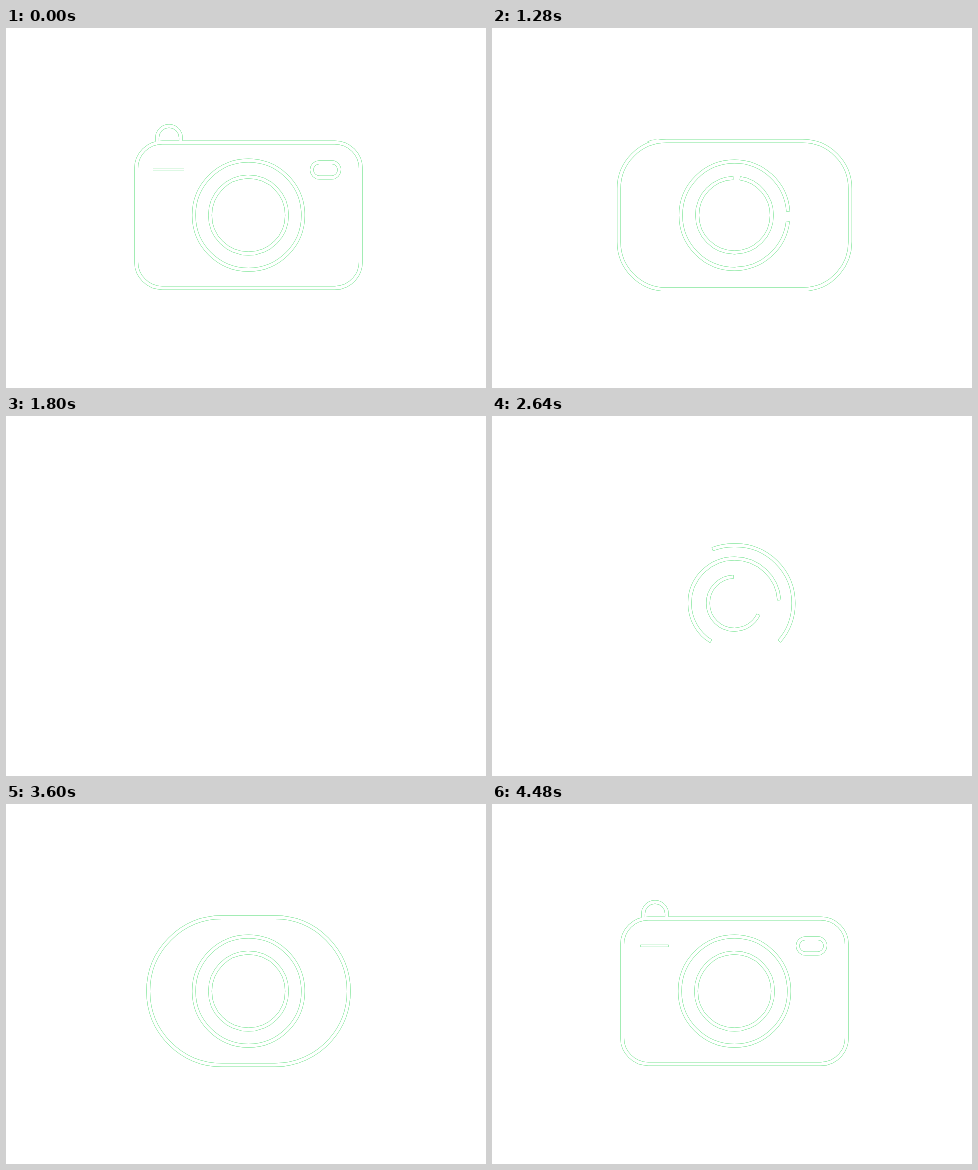
Recreate the animation shown at these times as an HTML page with a canvas. Size 480x360 px, loop 4.52 s.

```html
<!DOCTYPE html>
<html lang="en">
<head>
<meta charset="utf-8">
<title>Camera outline</title>
<style>
  html, body { margin: 0; width: 100%; height: 100%; overflow: hidden; background: #fff; }
  canvas { display: block; }
</style>
</head>
<body>
<canvas id="stage" width="480" height="360"></canvas>
<script>
const W = 480, H = 360, LOOP = 4520, STEP = 40;
const CX = 242.5, CY = 187.2;
const TINT = [162, 236, 180];

const view = document.getElementById('stage').getContext('2d');
const layer = document.createElement('canvas');
layer.width = W;
layer.height = H;
const c = layer.getContext('2d', { willReadFrequently: true });

const rad = d => d * Math.PI / 180;
const clamp = x => Math.min(1, Math.max(0, x));
const smooth = x => (1 - Math.cos(Math.PI * x)) / 2;

// Value at time t along [time, value] keys, eased between them
function track(t, ...keys) {
  if (t <= keys[0][0]) return keys[0][1];
  for (let i = 1; i < keys.length; i++) {
    const [t0, a] = keys[i - 1], [t1, b] = keys[i];
    if (t < t1) return a + (b - a) * smooth((t - t0) / (t1 - t0));
  }
  return keys[keys.length - 1][1];
}

// Visible share of a line: wiped away in the first half, drawn again in the second
function share(t, outAt, outFor, inAt, inFor, power = 3) {
  return t < 2000
    ? 1 - clamp((t - outAt) / outFor) ** power
    : 1 - (1 - clamp((t - inAt) / inFor)) ** power;
}

// Rounded box traced counter-clockwise from an angle, trimmed to a share
function outline(x, y, hw, hh, r, from, part) {
  if (part <= 0) return;
  const end = from - 360, len = 2 * Math.PI * r + 4 * (hw + hh - 2 * r);
  c.beginPath();
  for (let a = from; a > end;) {
    const b = Math.max(end, (Math.ceil(a / 90) - 1) * 90);
    const mid = rad((a + b) / 2);
    c.arc(x + Math.sign(Math.cos(mid)) * (hw - r),
          y + Math.sign(Math.sin(mid)) * (hh - r), r, rad(a), rad(b), true);
    a = b;
  }
  if (part >= 1) c.closePath();
  else c.setLineDash([part * len, len]);
  c.stroke();
  c.setLineDash([]);
}

function ring(r, shrink, from, part) {
  const size = r - shrink * (1 - part);
  outline(CX, CY, size, size, size, from, part);
}

function bump(drop, top) {
  if (drop >= 17) return;
  c.save();
  c.beginPath();
  c.rect(0, 0, W, top + 1);
  c.clip();
  c.beginPath();
  c.moveTo(151.2, 114 + drop);
  c.arc(163, 109.8 + drop, 11.8, Math.PI, 0);
  c.lineTo(174.8, 114 + drop);
  c.stroke();
  c.restore();
}

function slot(part) {
  if (part <= 0) return;
  c.lineWidth = 2;
  c.beginPath();
  c.moveTo(162.5 - 15.5 * part, 141.9);
  c.lineTo(162.5 + 15.5 * part, 141.9);
  c.stroke();
}

function draw(t) {
  c.clearRect(0, 0, W, H);
  c.lineWidth = 3.5;

  const body = share(t, 1264, 504, 2495, 865);
  const inset = 26 * (1 - body);
  const hw = track(t, [660, 112.25], [1230, 119.8], [1490, 72.3], [2200, 72.3],
    [2300, 74], [3380, 74], [3780, 119.4], [4480, 112.25]) - inset;
  const hh = track(t, [660, 72.75], [1230, 74.6], [1490, 69.4], [2200, 69.4],
    [2300, 73], [3400, 73], [3780, 74.6], [4480, 72.75]) - inset;
  const corner = track(t, [1180, 26], [1400, 76], [3560, 76], [3900, 26]);

  outline(CX, CY, hw, hh, Math.min(corner, hw, hh), 41, body);
  ring(54.6, 28, -4, share(t, 1120, 510, 2330, 1050));
  ring(38.4, 36, -92, share(t, 1120, 510, 2310, 1070));
  outline(319.5, 141.8, 13.8, 7.6, 7.6, -30, share(t, 660, 342, 3980, 520, 2));
  bump(track(t, [960, 0], [1360, 17], [3940, 17], [4300, 0]), CY - hh);
  slot(t < 480 ? 1 : share(t, 660, 400, 4120, 520, t < 2000 ? 3 : 2));
}

// Lines are white; only their soft edges carry the tint
function tintEdges() {
  const img = c.getImageData(0, 0, W, H), px = img.data;
  for (let i = 0; i < px.length; i += 4) {
    const a = px[i + 3] / 255, edge = 4 * a * (1 - a);
    for (let k = 0; k < 3; k++) px[i + k] = 255 - edge * (255 - TINT[k]);
    px[i + 3] = 255;
  }
  view.putImageData(img, 0, 0);
}

const start = performance.now();
let shown = -1;

function frame() {
  const t = Math.floor((performance.now() - start) % LOOP / STEP) * STEP;
  if (t !== shown) {
    shown = t;
    draw(t);
    tintEdges();
  }
  requestAnimationFrame(frame);
}
frame();
</script>
</body>
</html>
```
